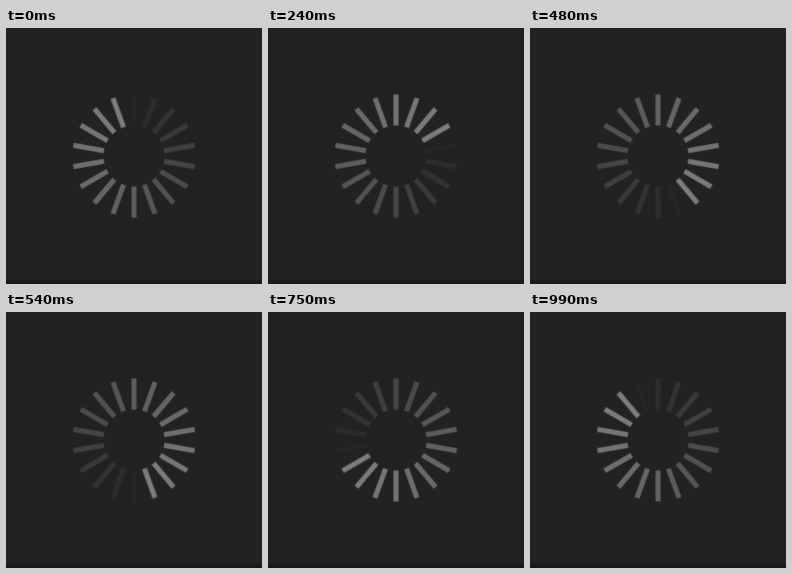
These frames come from a looping animation (256 px wide and 256 px high, 1020 ms). An HTML page without scripts:

```html
<!DOCTYPE html>
<html lang="en">
<head>
<meta charset="utf-8">
<title>Loading spinner</title>
<style>
  html, body { margin: 0; width: 100%; height: 100%; overflow: hidden; background: #222; }
  svg { display: block; width: 100%; height: 100%; }

  .wheel { animation: turn 1020ms infinite; }

  /* --k counts spokes behind the brightest one */
  .wheel use {
    fill: #fff;
    transform: rotate(calc(var(--k) * -20deg));
    opacity: calc(.41 - .015 * var(--k) - .0005 * var(--k) * var(--k));
  }

  @keyframes turn {
    0%      { transform: rotate(-20deg); animation-timing-function: steps(9); }
    52.941% { transform: rotate(160deg); animation-timing-function: step-end; }
    55.882% { transform: rotate(180deg); animation-timing-function: steps(7); }
    97.058% { transform: rotate(320deg); animation-timing-function: step-end; }
    100%    { transform: rotate(340deg); }
  }
</style>
</head>
<body>
<svg viewBox="0 0 256 256">
  <defs>
    <rect id="spoke" x="-2.5" y="-61.5" width="5" height="31"/>
  </defs>
  <rect y="252" width="256" height="4" fill="#1e171b"/>
  <g transform="translate(128 128)">
    <g class="wheel">
      <use href="#spoke" style="--k:0"/>
      <use href="#spoke" style="--k:1"/>
      <use href="#spoke" style="--k:2"/>
      <use href="#spoke" style="--k:3"/>
      <use href="#spoke" style="--k:4"/>
      <use href="#spoke" style="--k:5"/>
      <use href="#spoke" style="--k:6"/>
      <use href="#spoke" style="--k:7"/>
      <use href="#spoke" style="--k:8"/>
      <use href="#spoke" style="--k:9"/>
      <use href="#spoke" style="--k:10"/>
      <use href="#spoke" style="--k:11"/>
      <use href="#spoke" style="--k:12"/>
      <use href="#spoke" style="--k:13"/>
      <use href="#spoke" style="--k:14"/>
      <use href="#spoke" style="--k:15"/>
      <use href="#spoke" style="--k:16"/>
      <use href="#spoke" style="--k:17"/>
    </g>
  </g>
</svg>
</body>
</html>
```
